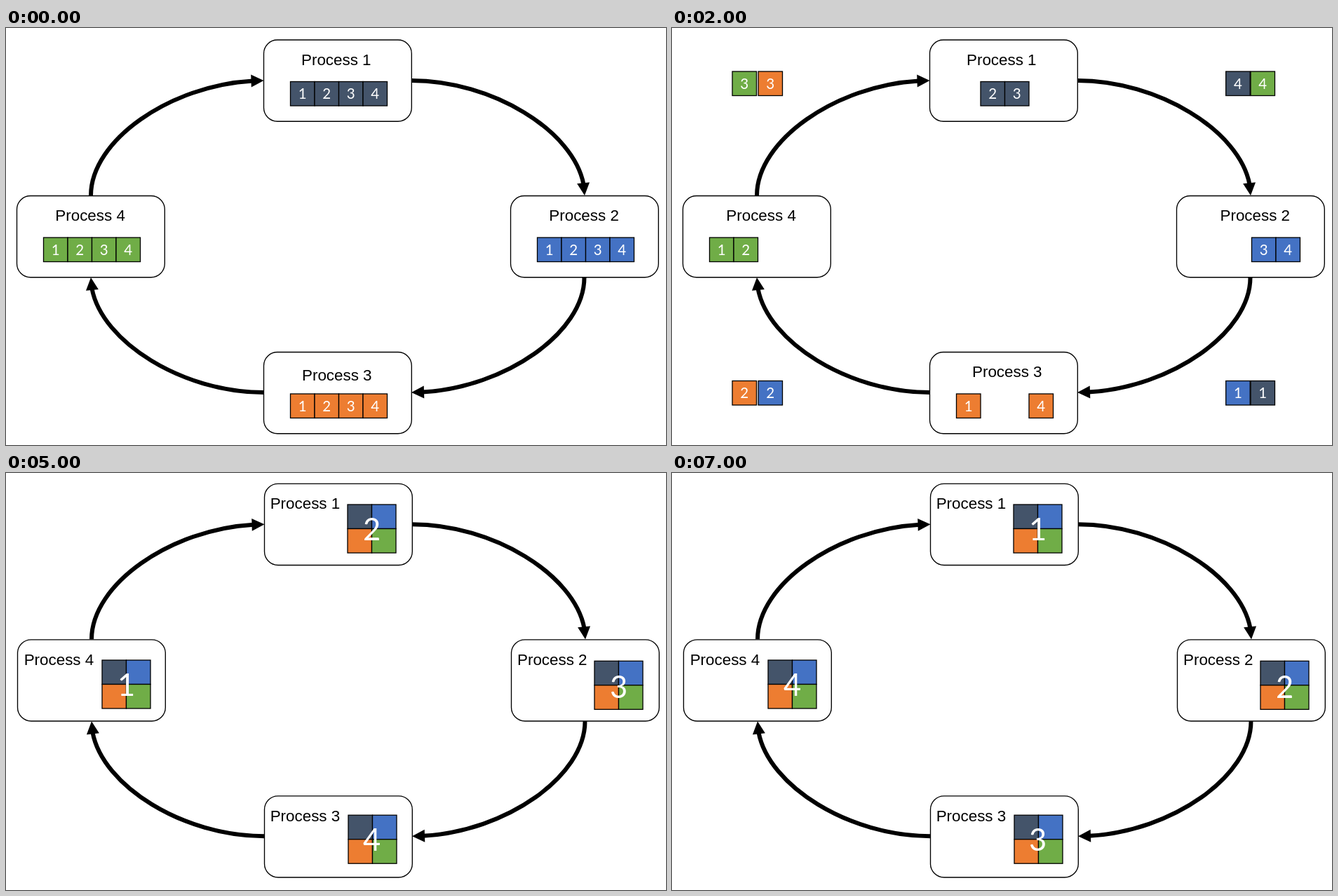
An HTML page for the animation above (8000 ms loop, 941 by 595 pixels).

```html
<!DOCTYPE html>
<html lang="en">
<head>
<meta charset="utf-8">
<title>Ring exchange between four processes</title>
<style>
  html, body { margin: 0; width: 100%; height: 100%; overflow: hidden; background: #fff; }
  svg { display: block; }
  .label { font: 22.4px "Liberation Sans", Arial, sans-serif; }
  .digit { font-family: Lato, Carlito, sans-serif; fill: #fff; text-anchor: middle; }
  .box { fill: #fff; stroke: #000; stroke-width: 1.35; }
  .arc { fill: none; stroke: #000; stroke-width: 6; }
</style>
</head>
<body>
<svg width="941" height="595" viewBox="0 0 941 595">
  <g id="ring"></g>
  <g id="content"></g>
</svg>
<script>
const ring = document.getElementById('ring');
const content = document.getElementById('content');
const COLORS = { d: '#44546a', b: '#4472c4', o: '#ed7d31', g: '#70ad47' };
const CELL = 34.5;
const NAVY = '#2f528f';

// Boxes and arrows stay the same for the whole loop, apart from a small shift.
const boxes = [[367.5, 17], [719.5, 239.5], [367.5, 462.5], [15.5, 239.5]];
const arcs = [
  'M578 75C701.5 75 825 157 825 239',
  'M824.5 356C824.5 438 701.5 520 578 520',
  'M367.5 520C244 520 121 438 121 356',
  'M121 239C121 157 244 75 367.5 75'
];
ring.innerHTML =
  arcs.map(d => `<path class="arc" d="${d}"/>`).join('') +
  boxes.map(([x, y]) => `<rect class="box" x="${x}" y="${y}" width="210.8" height="116.2" rx="19.4"/>`).join('');

for (const arc of ring.querySelectorAll('.arc')) {
  const length = arc.getTotalLength();
  const tip = arc.getPointAtLength(length);
  const base = arc.getPointAtLength(length - 18);
  const angle = Math.atan2(tip.y - base.y, tip.x - base.x) * 180 / Math.PI;
  arc.setAttribute('stroke-dasharray', `${length - 16} 99`);
  ring.insertAdjacentHTML('beforeend',
    `<path d="M0 0L-18 -9V9Z" transform="translate(${tip.x} ${tip.y}) rotate(${angle})"/>`);
}

const labels = points => points.map(([x, y], i) =>
  `<text class="label" x="${x}" y="${y}">Process ${i + 1}</text>`).join('');

const square = (x, y, color, stroke = '#000') =>
  `<rect x="${x}" y="${y}" width="${CELL}" height="${CELL}" fill="${COLORS[color]}" stroke="${stroke}" stroke-width="1.3"/>`;

const digit = (x, y, size, value) =>
  `<text class="digit" x="${x}" y="${y}" font-size="${size}">${value}</text>`;

const block = (x, y, [color, value], stroke) =>
  square(x, y, color, stroke) + digit(x + CELL / 2, y + 24.7, 20.5, value);

// Blocks side by side; '-' leaves a slot empty.
const row = (x, y, names, step = CELL) => names.split(' ').map((name, i) =>
  name === '-' ? '' : block(x + i * step, y, name)).join('');

// The four rows inside the boxes, clockwise from the top.
const slots = [[405.5, 76.5], [757.5, 299], [405.5, 522], [53.5, 299]];
const held = (...rows) => rows.map((names, i) => row(...slots[i], names)).join('');

// The four groups on the arrows, clockwise from the top right, ending at a common slot.
const moving = (...groups) => groups.map((names, i) => {
  const step = i < 2 ? 35.3 : 37;
  const last = i < 2 ? 825 : 123;
  const count = names.split(' ').length;
  return row(last - (count - 1) * step, i % 3 ? 503.5 : 62, names, step);
}).join('');

// A finished chunk: four colours under one large number.
const chunk = (x, y, value, dx = 0, dy = 0) =>
  [...'dbog'].map((c, i) => square(x + i % 2 * CELL, y + (i >> 1) * CELL, c)).join('') +
  digit(x + CELL + dx, y + 51.2 + dy, 43.5, value);

const centered = labels([[421, 52.5], [774.3, 275.3], [422, 503.3], [70.3, 275.3]]);
const offset = labels([[420, 52.5], [781.5, 275.3], [428, 498.3], [77.3, 275.3]]);
const cornered = labels([[376.7, 50.8], [729, 273.6], [376.7, 496.6], [25.7, 273.6]]);

const chunks = ([a, b, c, d]) => cornered +
  chunk(487, 45, a) + chunk(839, 268.3, b, 0, 1) +
  chunk(488, 488.2, c, -1) + chunk(137, 267, d);

const scenes = [
  centered + held('d1 d2 d3 d4', 'b1 b2 b3 b4', 'o1 o2 o3 o4', 'g1 g2 g3 g4'),

  offset + held('- d2 d3 d4', 'b1 - b3 b4', 'o1 o2 - o4', 'g1 g2 g3') +
    moving('d1', 'b2', 'o3', 'g4'),

  offset + held('- d2 d3', '- - b3 b4', 'o1 - - o4', 'g1 g2') +
    moving('d4 g4', 'b1 d1', 'o2 b2', 'g3 o3'),

  offset + held('- d2', '- - b3', '- - - o4', 'g1') +
    moving('g3 o3 d3', 'b4 d4 g4', 'o1 b1 d1', 'g2 o2 b2'),

  offset +
    block(400.5, 76, 'g2', NAVY) + row(440.3, 76.7, 'd2 o2') + block(510.3, 76, 'b2', NAVY) +
    block(754.3, 298.5, 'g3') + block(789.5, 297.7, 'o3', NAVY) +
    block(826.5, 299, 'b3', NAVY) + block(861.7, 298.7, 'd3', NAVY) +
    block(391, 522, 'b4', NAVY) + block(431, 522.7, 'd4') +
    block(469.5, 522.5, 'g4', NAVY) + block(508.7, 521.7, 'o4') +
    row(53.5, 299, 'g1 o1') + block(125.5, 299, 'b1', NAVY) + block(163.5, 299, 'd1', NAVY),

  chunks('2341'),

  cornered + chunk(728.5, 22.8, 2, -1) + chunk(764, 478.8, 3, -1.5, 1) +
    chunk(120.8, 478.8, 4, -1.5, 1) + chunk(114.5, 56, 1, 0, 1),

  chunks('1234')
];

let shown = -1;
function draw(now) {
  const index = Math.floor(now / 1000) % scenes.length;
  if (index !== shown) {
    shown = index;
    content.innerHTML = scenes[index];
    ring.setAttribute('transform', index < 5 ? '' : 'translate(1 -1.7)');
  }
  requestAnimationFrame(draw);
}
draw(performance.now());
</script>
</body>
</html>
```
